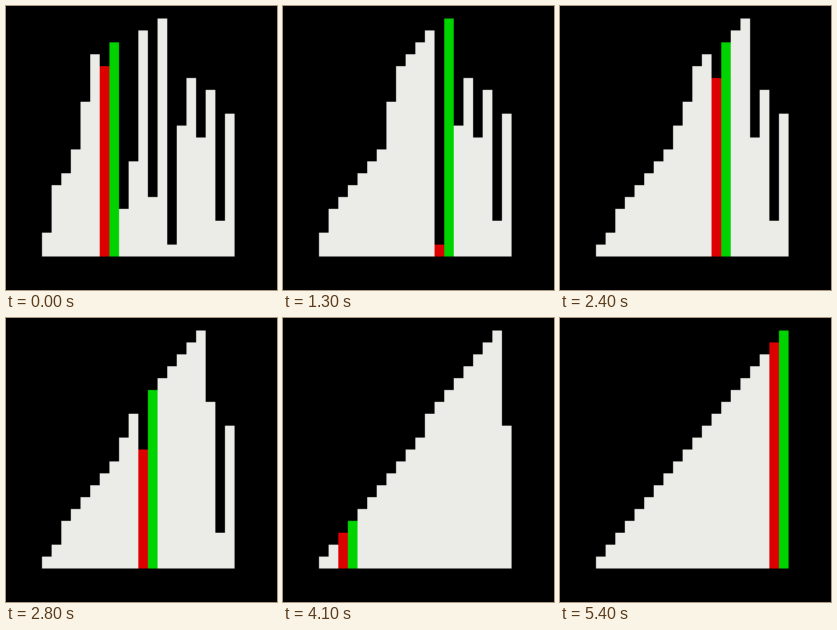
These frames come from a looping animation (271x284 px, 5500 ms). A matplotlib script:

```python
import numpy as np
import matplotlib.pyplot as plt
from matplotlib.animation import FuncAnimation
from matplotlib.colors import to_rgb

W, H, DPI = 271, 284, 64
FRAMES, INTERVAL = 55, 100
STEPS = 4                      # sorting operations per frame
LEFT, PITCH = 36, 9.63
BASE, UNIT = 250.5, 11.9
SOFT = 1.3                     # width of the bar edges in pixels
WHITE, RED, GREEN = map(to_rgb, ("#ebebe8", "#dc0000", "#00d400"))

START = [2, 6, 7, 9, 13, 17, 18, 16, 4, 8, 19, 5, 20, 1, 11, 15, 10, 14, 3, 12]
FIRST = 7                      # the part before this index is already sorted
N = len(START)


def insertion_sort():
    """Yield (values, marked index) after every operation."""
    a, mark = START[:], None
    for i in range(FIRST, N):
        j = i
        while j > 0:
            yield a[:], mark                   # compare
            if a[j - 1] <= a[j]:
                break
            a[j - 1], a[j] = a[j], a[j - 1]
            j -= 1
            mark = j
            yield a[:], mark                   # swap
    for _ in range(STEPS):                     # short pause, nothing marked
        yield a[:], None
    for k in range(N - 1):                     # final check of the order
        yield a[:], k


def coverage(start, end, size):
    """Share of each pixel in a row that lies between start and end."""
    centre = np.arange(size) + 0.5

    def ramp(edge):
        return np.clip((centre - np.reshape(edge, (-1, 1))) / SOFT + 0.5, 0, 1)

    return ramp(start) - ramp(end)


states = list(insertion_sort())[1:]            # begin on the first swap
edges = LEFT + PITCH * np.arange(N + 1)
columns = coverage(edges[:-1], edges[1:], W)


def render(frame):
    values, mark = states[min(frame * STEPS, len(states) - 1)]
    rows = coverage(BASE - UNIT * np.array(values), BASE, H)
    colors = np.array([WHITE] * N)
    if mark is not None:
        colors[mark:mark + 2] = RED, GREEN
    return np.clip(np.einsum("ky,kx,kc->yxc", rows, columns, colors), 0, 1)


fig = plt.figure(figsize=(W / DPI, H / DPI), dpi=DPI, facecolor="black")
ax = fig.add_axes([0, 0, 1, 1])
ax.axis("off")
picture = ax.imshow(render(0), aspect="auto", interpolation="nearest")


def draw(frame):
    picture.set_data(render(frame))
    return [picture]


anim = FuncAnimation(fig, draw, frames=FRAMES, interval=INTERVAL,
                     init_func=lambda: draw(0), repeat=True, repeat_delay=0)
plt.show()
```
